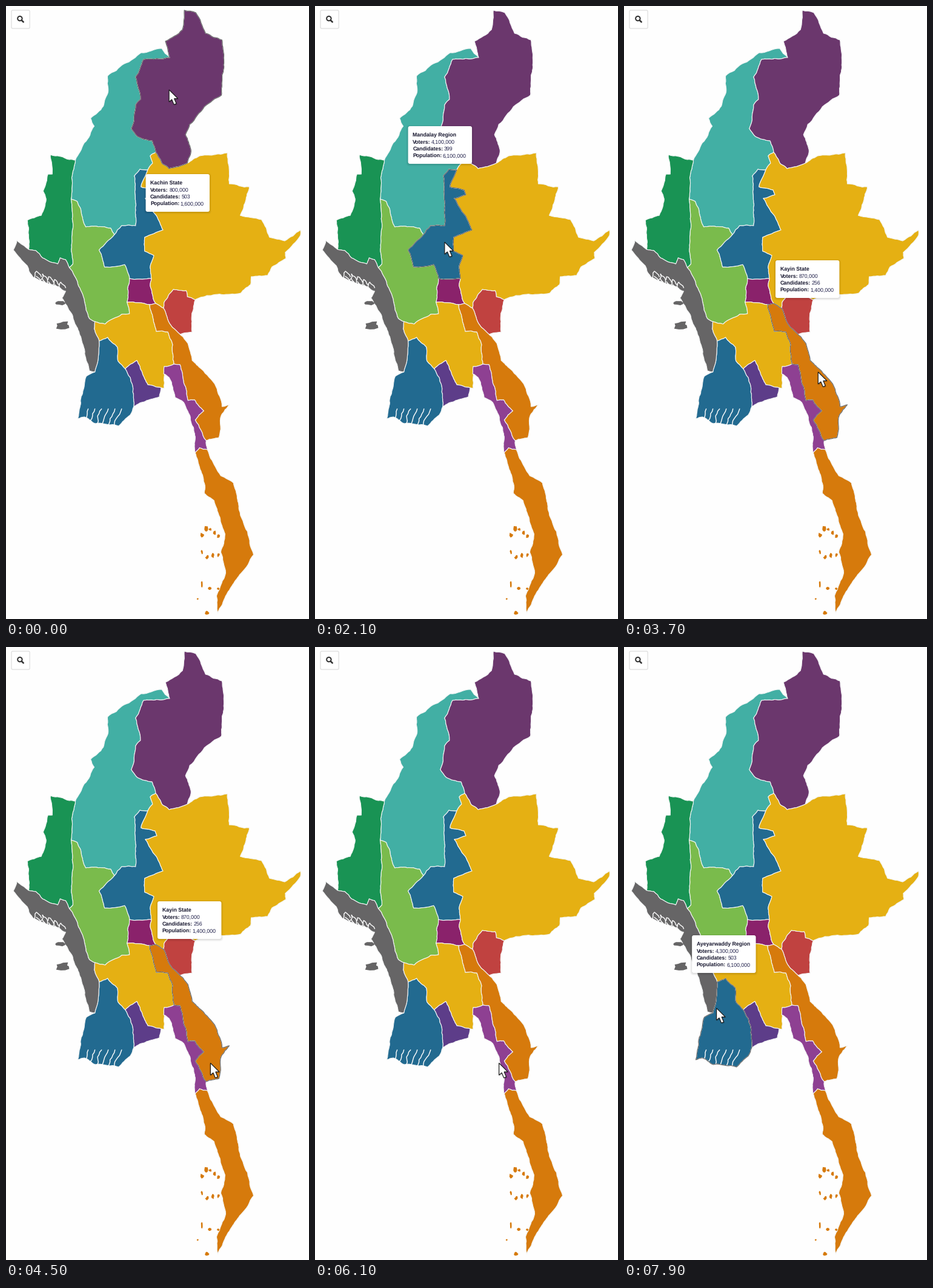
These frames come from a looping animation (500x1010 px, 8000 ms). A matplotlib script:

```python
import numpy as np
import matplotlib.pyplot as plt
from matplotlib.animation import FuncAnimation
from matplotlib.patches import Circle, FancyBboxPatch, Polygon
from matplotlib.path import Path

W, H, DPI = 500, 1010, 100
FRAMES, STEP = 80, 100
PX = 72 / DPI
PAPER = "#fefefe"
plt.rcParams["text.hinting"] = "no_hinting"
rng = np.random.default_rng(7)

fig = plt.figure(figsize=(W / DPI, H / DPI), dpi=DPI, facecolor=PAPER)
ax = fig.add_axes([0, 0, 1, 1])
ax.set_xlim(0, W - 2)
ax.set_ylim(H, 0)
ax.axis("off")


def border(*points, rough=0.07):
    """Roughen a coarse line by repeated midpoint displacement."""
    pts = np.array(points, float)
    while True:
        steps = np.diff(pts, axis=0)
        sizes = np.hypot(*steps.T)
        if sizes.max() < 5:
            return pts
        out = [pts[0]]
        for a, b, d, size in zip(pts, pts[1:], steps, sizes):
            if size >= 5:
                shift = rng.uniform(-1, 1) * min(rough * size, 1.6) / size
                out.append((a + b) / 2 + shift * np.array([-d[1], d[0]]))
            out.append(b)
        pts = np.array(out)


def chain(arcs):
    """Join shared borders end to end, flipping them where needed."""
    line, rest = arcs[0], arcs[1:]
    ends = (rest[0][0], rest[0][-1])
    if not any(np.array_equal(line[-1], e) for e in ends):
        line = line[::-1]
    for arc in rest:
        if not np.array_equal(arc[0], line[-1]):
            arc = arc[::-1]
        line = np.vstack([line, arc])
    return line


def shape(pts, color):
    ax.add_patch(Polygon(pts, fc=color, ec="#f4f6f6", lw=1.1 * PX,
                         joinstyle="round", zorder=1))


regions = {}


def region(name, color, *arcs):
    regions[name] = chain(arcs)
    shape(regions[name], color)


# Junctions where three areas, or two and the outside, meet
KA_W, KA_E, KA_S = (269, 85), (298, 259), (246, 241)
CH_N, CH_E, CH_S, CH_W = (114, 254), (107, 318), (104, 431), (37, 401)
MD_N, MD_W, MD_SW, MD_SE = (233, 270), (178, 377), (203, 449), (239, 449)
NP_SW, NP_S, NP_SE = (199, 488), (236, 492), (246, 490)
KY_W, KY_E, KY_S = (259, 498), (311, 484), (286, 541)
BG_W, BG_SW, BG_S = (146, 520), (153, 552), (255, 629)
MO_N, MO_NW, MO_SE, MO_SW = (276, 590), (260, 594), (331, 731), (311, 736)
KN_S, YG_N, YG_S, RK_S = (329, 716), (196, 598), (210, 660), (146, 603)

# Northern borders
ka_out = border(KA_W, (262, 58), (290, 39), (293, 7), (312, 11), (328, 45),
                (355, 56), (358, 103), (354, 147), (326, 166), (302, 195),
                (295, 212), (304, 237), KA_E)
ka_sh = border(KA_E, (268, 268), (257, 260), KA_S)
ka_sg = border(KA_S, (240, 222), (216, 215), (206, 202), (213, 163),
               (221, 154), (213, 117), (226, 88), KA_W)
sg_out = border(KA_W, (256, 70), (222, 77), (167, 115), (168, 140),
                (160, 165), (139, 185), (145, 198), CH_N)
sg_ch = border(CH_N, (108, 283), CH_E)
sg_mg = border(CH_E, (117, 322), (131, 364), (172, 366), MD_W)
sg_md = border(MD_W, (190, 362), (213, 362), (211, 280), (220, 269), MD_N)
sg_sh = border(MD_N, (241, 259), (237, 247), KA_S)
ch_out = border(CH_N, (104, 253), (73, 245), (76, 277), (69, 277), (61, 305),
                (66, 318), (58, 345), (35, 353), CH_W)
ch_rk = border(CH_W, (49, 403), (60, 415), (85, 425), (89, 415), (98, 418),
               CH_S)
ch_mg = border(CH_S, (110, 425), (109, 370), CH_E)

# Central and eastern borders
md_sh = border(MD_N, (222, 298), (245, 303), (248, 311), (229, 317),
               (247, 345), (258, 369), (228, 381), (228, 404), (243, 411),
               (238, 425), MD_SE)
md_np = border(MD_SE, (219, 450), MD_SW)
md_mg = border(MD_W, (153, 402), (162, 430), (195, 426), MD_SW)
mg_np = border(MD_SW, (200, 466), NP_SW)
mg_bg = border(NP_SW, (203, 507), (190, 508), (163, 524), BG_W)
mg_rk = border(BG_W, (137, 515), (118, 458), CH_S)
np_bg = border(NP_SW, NP_S)
np_kn = border(NP_S, NP_SE)
np_sh = border(NP_SE, (240, 473), (237, 461), MD_SE)
sh_out = border(KA_E, (318, 247), (364, 242), (367, 293), (400, 298),
                (385, 345), (420, 352), (433, 381), (458, 387), (484, 369),
                (484, 378), (459, 406), (460, 416), (437, 430), (430, 444),
                (403, 446), (402, 459), (386, 473), (330, 477), KY_E)
sh_ky = border(KY_E, (298, 479), (296, 469), (275, 467), (260, 488), KY_W)
sh_kn = border(KY_W, NP_SE)
ky_out = border(KY_E, (305, 514), (306, 537), KY_S)
ky_kn = border(KY_S, (271, 526), KY_W)
kn_out = border(KY_S, (299, 556), (306, 584), (321, 598), (345, 627),
                (355, 660), (367, 657), (354, 674), (350, 711), KN_S)
kn_mo = border(KN_S, (311, 682), (325, 667), (310, 649), (299, 650),
               (286, 591), MO_N)

# Southern borders and coast
bg_kn = border(MO_N, (274, 558), (266, 537), (247, 536), NP_S)
bg_mo = border(MO_N, MO_NW)
bg_out = border(MO_NW, (260, 630), BG_S)
bg_yg = border(BG_S, (233, 624), (215, 584), YG_N)
bg_ay = border(YG_N, (184, 585), (183, 562), (167, 546), BG_SW)
bg_rk = border(BG_SW, (145, 532), BG_W)
ay_yg = border(YG_N, (204, 612), YG_S)
yg_out = border(YG_S, (231, 650), (252, 644), BG_S)
ay_out = border(YG_S, (204, 674), (185, 692), (147, 688), (129, 677),
                (118, 680), (126, 638), (132, 610), RK_S)
rk_ay = border(RK_S, (151, 585), BG_SW, rough=0.03)
rk_out = border(RK_S, (137, 601), (123, 545), (108, 507), (92, 481),
                (98, 470), (73, 458), (42, 445), (35, 428), (12, 402),
                (18, 386), CH_W)
mo_e = border(KN_S, MO_SE)
mo_tn = border(MO_SE, (318, 728), MO_SW)
mo_w = border(MO_SW, (308, 694), (292, 653), (278, 645), (268, 612),
              (259, 606), MO_NW)
tn_out = border(MO_SE, (344, 759), (353, 774), (374, 786), (383, 830),
                (397, 866), (407, 904), (386, 935), (361, 972), (348, 1000),
                (346, 972), (361, 934), (353, 900), (360, 870), (342, 815),
                (326, 803), (327, 790), MO_SW)

BLUE, YELLOW, ORANGE, GREY = "#226a90", "#e5b013", "#d67a0c", "#666566"
region("Sagaing", "#42afa4", sg_out, sg_ch, sg_mg, sg_md, sg_sh, ka_sg)
region("Kachin", "#6b376d", ka_out, ka_sh, ka_sg)
region("Chin", "#199354", ch_out, ch_rk, ch_mg, sg_ch)
region("Magway", "#7abb4c", sg_mg, md_mg, mg_np, mg_bg, mg_rk, ch_mg)
region("Mandalay", BLUE, sg_md, md_sh, md_np, md_mg)
region("Capital", "#8a226b", md_np, mg_np, np_bg, np_kn, np_sh)
region("Shan", YELLOW, ka_sh, sh_out, sh_ky, sh_kn, np_sh, md_sh, sg_sh)
region("Kayah", "#c04240", sh_ky, ky_out, ky_kn)
region("Bago", YELLOW, mg_bg, np_bg, bg_kn, bg_mo, bg_out, bg_yg, bg_ay,
       bg_rk)
region("Kayin", ORANGE, np_kn, sh_kn, ky_kn, kn_out, kn_mo, bg_kn)
region("Mon", "#8e4092", bg_mo, kn_mo, mo_e, mo_tn, mo_w)
region("Yangon", "#5d3d89", bg_yg, ay_yg, yg_out)
region("Ayeyarwaddy", BLUE, bg_ay, ay_yg, ay_out, rk_ay)
region("Rakhine", GREY, ch_rk, mg_rk, bg_rk, rk_ay, rk_out)
region("Tanintharyi", ORANGE, mo_tn, tn_out)


def islet(x, y, rx, ry, color):
    a = np.arange(0, 2 * np.pi, 0.6)
    r = rng.uniform(0.6, 1.2, a.size)
    ax.add_patch(Polygon(np.c_[x + rx * r * np.cos(a), y + ry * r * np.sin(a)],
                         fc=color, lw=0, zorder=1))


def creek(*points):
    ax.plot(*border(*points, rough=0.2).T, color=PAPER, lw=1.4 * PX,
            zorder=1.5)


# Islands off the western coast and a southern archipelago in three rows
islet(89, 489, 9, 4, GREY)
islet(93, 526, 12, 7, GREY)
for row, count in ((868, 5), (906, 4), (955, 3)):
    for x in np.linspace(322, 349, count):
        islet(x, row + rng.uniform(-8, 8), rng.uniform(1.5, 3.5),
              rng.uniform(2, 6), ORANGE)
islet(330, 1000, 4, 4, ORANGE)
islet(315, 977, 1.5, 1.5, ORANGE)

# Tidal creeks of the delta, then of the western coast
for k in range(6):
    x = 128 + 10 * k
    creek((x, 695), (x + 3, 680), (x + 7 + k, 664))
for x in range(40, 90, 10):
    y = 441 + 0.45 * (x - 40)
    creek((x, y), (x + 7, y + 9), (x + 10, y - 4), (x + 18, y + 5))

# Search button
ax.add_patch(FancyBboxPatch((11, 9), 26, 26, boxstyle="round,pad=2",
                            fc="white", ec="#dcdcdc", lw=1.2 * PX, zorder=2))
ax.add_patch(Circle((22.8, 20.6), 3.7, fc="none", ec="#333333", lw=2 * PX,
                    zorder=2))
ax.plot([25.8, 28.6], [23.6, 26.4], color="#333333", lw=2.6 * PX,
        solid_capstyle="round", zorder=2)


BOX_W, BOX_H = 105, 62


def panel(x, y, pad, **style):
    """A rounded box that reaches pad - 3 beyond the tooltip's edge."""
    return ax.add_patch(FancyBboxPatch(
        (x + 3, y + 3), BOX_W - 6, BOX_H - 6, lw=0, zorder=4,
        boxstyle=f"round,pad={pad}", **style))


def tooltip(name, title, voters, candidates, population):
    """Centre the box above its region, or below when there is no room."""
    low, high = regions[name].min(axis=0), regions[name].max(axis=0)
    x = (low[0] + high[0] - BOX_W) / 2
    y = low[1] - BOX_H - 9
    if y < 0:
        y = high[1] + 9
    parts = [panel(x, y + 1, p, fc="black", alpha=0.03) for p in range(3, 7)]
    parts.append(panel(x, y, 3, fc="white"))
    font = dict(family="Liberation Sans", fontsize=8.75 * PX, zorder=5)
    rows = (title, None), ("Voters:", voters), \
        ("Candidates:", candidates), ("Population:", population)
    for i, (label, value) in enumerate(rows):
        base = y + 17 + 11.5 * i
        head = ax.text(x + 7.5, base, label, weight="bold", color="#16162e",
                       **font)
        parts.append(head)
        if value:
            parts.append(ax.annotate(
                value, (1, base), xycoords=(head, "data"),
                xytext=(1.5 * PX, 0), textcoords="offset points",
                color="#20204a", annotation_clip=False, **font))
    for part in parts:
        part.set_visible(False)
    return parts


TIP_TEXT = {
    "Kachin": ("Kachin State", "800,000", "503", "1,600,000"),
    "Shan": ("Shan State", "3,000,000", "866", "6,000,000"),
    "Mandalay": ("Mandalay Region", "4,100,000", "399", "6,100,000"),
    "Kayin": ("Kayin State", "870,000", "256", "1,400,000"),
    "Bago": ("Bago Region", "3400000", "546", "6,000,000"),
    "Ayeyarwaddy": ("Ayeyarwaddy Region", "4,300,000", "503", "6,100,000"),
}
tips = {name: tooltip(name, *text) for name, text in TIP_TEXT.items()}

outline = ax.add_patch(Polygon(regions["Kachin"], fc="none", ec="#6a6a6a",
                               lw=1.2 * PX, joinstyle="round", zorder=3))
ARROW = np.array([(0, 0), (0, 20), (4.5, 16), (8, 24.5), (12, 22.8),
                  (8.5, 14.5), (14.5, 14.5)])
shadow = ax.add_patch(Polygon(ARROW, fc="black", alpha=0.2, lw=0, zorder=6))
pointer = ax.add_patch(Polygon(ARROW, fc="white", ec="#1a1a1a", lw=1.2 * PX,
                               zorder=7))

areas = {name: Path(pts) for name, pts in regions.items()}
# Pointer stops: time in ms, x, y
STOPS = np.array([(0, 268, 138), (800, 335, 290), (2100, 213, 389),
                  (3700, 319, 603), (5300, 353, 768), (7000, 242, 587),
                  (7900, 152, 595)], float)


def pointer_at(t):
    i = min(np.searchsorted(STOPS[:, 0], t, side="right") - 1, len(STOPS) - 2)
    a, b = STOPS[i], STOPS[i + 1]
    u = (t - a[0]) / (b[0] - a[0])
    u = u * u * (3 - 2 * u)
    return a[1:] + (b[1:] - a[1:]) * u


def draw(frame):
    tip = pointer_at(frame * STEP)
    pointer.set_xy(ARROW + tip)
    shadow.set_xy(ARROW + tip + 1.5)
    hovered = next((n for n, p in areas.items() if p.contains_point(tip)), None)
    outline.set_visible(hovered is not None)
    if hovered:
        outline.set_xy(regions[hovered])
    for name, parts in tips.items():
        for part in parts:
            part.set_visible(name == hovered)
    return []


anim = FuncAnimation(fig, draw, frames=FRAMES, interval=STEP, repeat=True,
                     repeat_delay=0, blit=False)
plt.show()
```
